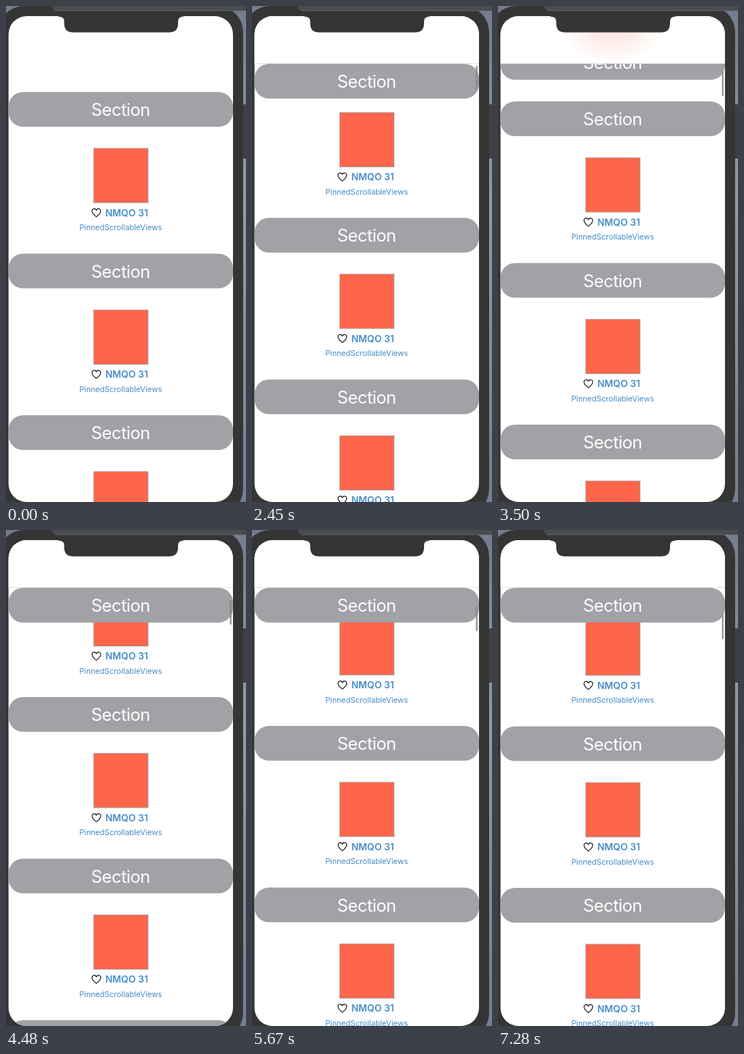
Animation, 332 px wide and 686 px high, one loop 7.35 s. Source, as an HTML page:

```html
<!DOCTYPE html>
<html lang="en">
<head>
<meta charset="utf-8">
<title>Pinned section headers</title>
<style>
  html, body { margin: 0; width: 100%; height: 100%; overflow: hidden; background: #788294; }
  svg { display: block; width: 332px; height: 686px; }
  text { font-family: Inter, Roboto, sans-serif; }
  .section { font-size: 24px; letter-spacing: -.55px; fill: #fff; text-anchor: middle; }
  .title { font-size: 13px; font-weight: 600; fill: #438cc8; }
  .subtitle { font-size: 10.7px; fill: #438cc8; text-anchor: middle; }
</style>
</head>
<body>
<svg viewBox="0 0 332 686" xmlns="http://www.w3.org/2000/svg">
  <defs>
    <linearGradient id="desk" x2="0" y2="1">
      <stop offset="0" stop-color="#737b8e"/>
      <stop offset=".4" stop-color="#929ca4"/>
      <stop offset="1" stop-color="#737d94"/>
    </linearGradient>
    <radialGradient id="glow">
      <stop offset="0" stop-color="#fe664b" stop-opacity=".19"/>
      <stop offset=".45" stop-color="#fe664b" stop-opacity=".13"/>
      <stop offset="1" stop-color="#fe664b" stop-opacity="0"/>
    </radialGradient>
    <clipPath id="screen"><rect x="3.5" y="14" width="310.5" height="672" rx="25"/></clipPath>
    <clipPath id="barArea"><rect width="332" height="79"/></clipPath>
    <g id="header">
      <rect x="3.5" width="310.5" height="48" rx="20" fill="#a2a1a6"/>
      <text class="section" x="158.5" y="33">Section</text>
    </g>
    <g id="card">
      <rect x="121" y="-.5" width="76" height="76" fill="#a99c9a"/>
      <rect x="121.8" y=".3" width="74" height="74.2" fill="#fe664b"/>
      <path d="M125 94.6C121.5 92 119 89.5 119 86.6C119 83 123.3 82.2 125 85.4C126.7 82.2 131 83 131 86.6C131 89.5 128.5 92 125 94.6Z"
            fill="none" stroke="#111" stroke-width="1.1" stroke-linejoin="round"/>
      <text class="title" x="137.5" y="93.6">NMQO 31</text>
      <text class="subtitle" x="158.7" y="113">PinnedScrollableViews</text>
    </g>
  </defs>

  <rect width="332" height="686" fill="url(#desk)"/>
  <rect x="326" y="136" width="6" height="75" fill="#40403f"/>
  <rect x="-11" width="339" height="704" rx="36" fill="#353535"/>
  <path d="M64 0H332V7H70Q64 6 64 0Z" fill="#4b4c4e"/>
  <path d="M68 6.5H332" stroke="#66686a" stroke-width=".8"/>

  <g clip-path="url(#screen)">
    <rect width="332" height="686" fill="#fff"/>
    <g id="cards"></g>
    <g id="headers"></g>
    <g id="bar">
      <rect width="332" height="80" fill="#fff"/>
      <g id="glows" clip-path="url(#barArea)"></g>
      <path d="M3 79.5H314" stroke="#e2e2e3"/>
      <rect id="thumb" x="309.6" width="2.6" height="34" rx="1.3" fill="#858587" fill-opacity=".8"/>
    </g>
  </g>
  <path d="M72 13H246V14.5Q238 14.5 238 21V24Q238 36.5 225.5 36.5H93Q80.500 36.500 80.500 24V21Q80.500 14.500 72 14.500Z" fill="#353535"/>
</svg>
<script>
  const LOOP = 7350, STEP = 70;
  const COUNT = 8, PITCH = 223.5, TOP = 119, PIN = 80;
  const SECTION_END = PITCH - 78;
  const keys = [[2100, 0], [2450, 49.5], [3500, 210.5], [4480, 335],
                [5670, 518.5], [6720, 701.5], [7280, 741.5]];
  const byId = id => document.getElementById(id);

  function add(parent, tag, attrs) {
    const el = document.createElementNS('http://www.w3.org/2000/svg', tag);
    for (const name in attrs) el.setAttribute(name, attrs[name]);
    return byId(parent).appendChild(el);
  }

  const sections = Array.from({ length: COUNT }, () => ({
    card: add('cards', 'use', { href: '#card' }),
    header: add('headers', 'use', { href: '#header' }),
    glow: add('glows', 'ellipse', { cx: 158.5, rx: 72, ry: 56, fill: 'url(#glow)' })
  }));

  // Smooth curve through the scroll positions
  function slope(i) {
    if (i === 0 || i === keys.length - 1) return 0;
    const [a, b] = [keys[i - 1], keys[i + 1]];
    return (b[1] - a[1]) / (b[0] - a[0]);
  }

  function scrollAt(t) {
    if (t <= keys[0][0]) return 0;
    const i = keys.findIndex(k => k[0] >= t) - 1;
    const [t0, y0] = keys[i], [t1, y1] = keys[i + 1];
    const d = t1 - t0, u = (t - t0) / d, v = 1 - u;
    return v * v * (1 + 2 * u) * y0 + u * u * (3 - 2 * u) * y1
      + u * v * d * (v * slope(i) - u * slope(i + 1));
  }

  function render(t) {
    const scroll = scrollAt(t);
    sections.forEach(({ card, header, glow }, k) => {
      const y = TOP + PITCH * k - scroll;
      const pinned = Math.max(y, Math.min(PIN, y + SECTION_END));
      card.setAttribute('y', y + 78);
      header.setAttribute('y', pinned);
      glow.setAttribute('cy', y + 115.5);
      glow.setAttribute('visibility', y + 153 < PIN ? 'inherit' : 'hidden');
    });
    byId('bar').setAttribute('visibility', scroll > 0 ? 'visible' : 'hidden');
    byId('thumb').setAttribute('y', PIN + scroll * 0.05);
  }

  const start = performance.now();
  function tick() {
    const t = (performance.now() - start) % LOOP;
    render(Math.floor(t / STEP) * STEP);
    requestAnimationFrame(tick);
  }
  tick();
</script>
</body>
</html>
```
